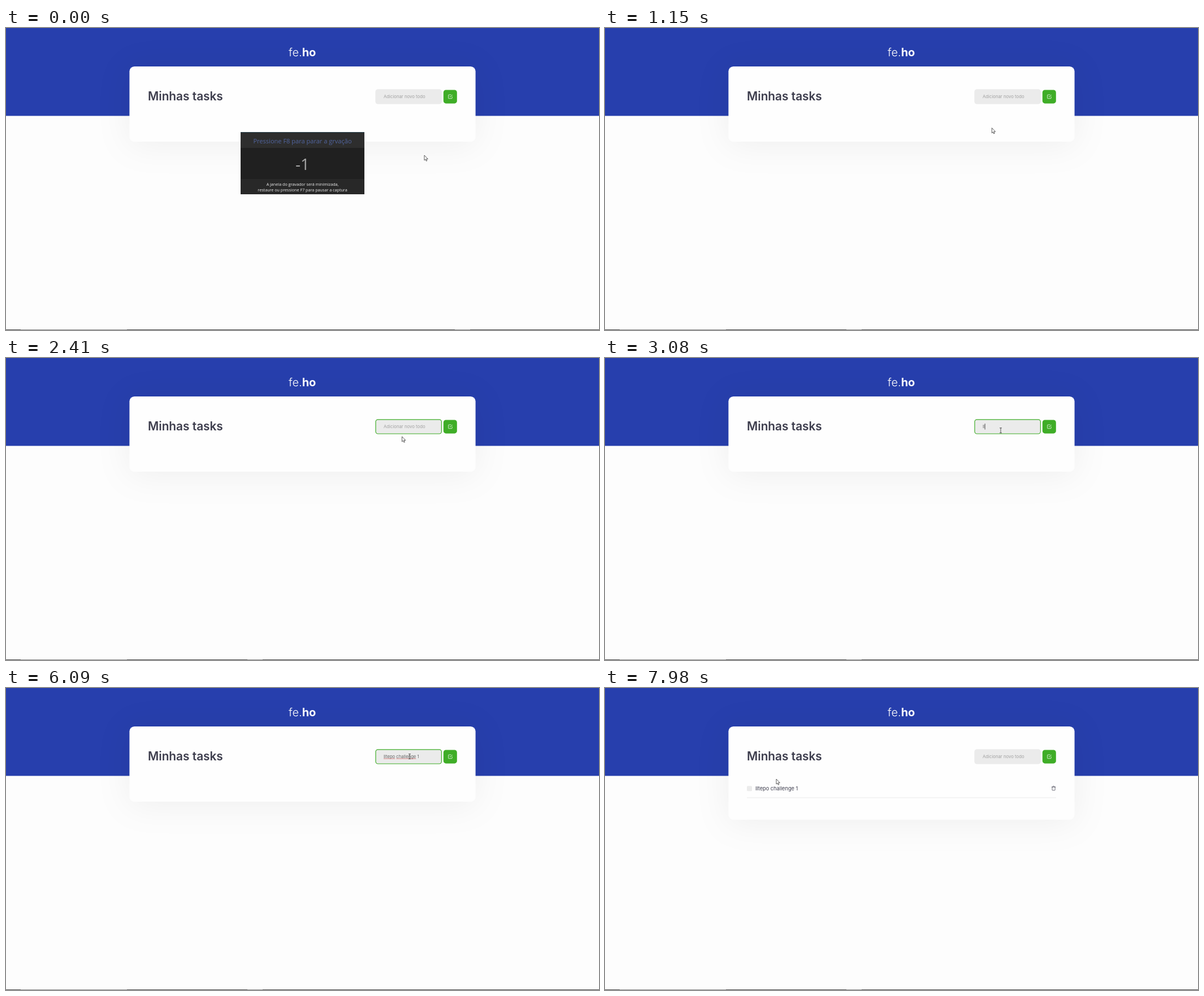
Animation, 1049 px wide and 534 px high, one loop 8000 ms. Source, as an HTML page:

```html
<!DOCTYPE html>
<html lang="pt-BR">
<head>
<meta charset="utf-8">
<title>Minhas tasks</title>
<style>
  html, body { margin: 0; width: 100%; height: 100%; overflow: hidden; background: #fdfdfd; }
  svg { display: block; }
  #card { fill: #fefefe; filter: drop-shadow(0 5px 30px rgba(0, 0, 0, .06)); }
  text { font-family: Inter, sans-serif; fill: #3d3d4d; white-space: pre; }
  .logo { font-size: 20px; font-weight: 300; fill: #fff; }
  .bold { font-weight: 700; }
  .title { font-size: 20.8px; font-weight: 600; }
  .field { font-size: 7.65px; fill: #666; }
  .hint { font-size: 7.75px; fill: #a2a2a2; }
  .task { font-size: 9.2px; }
  #dialog text { font-family: "Open Sans", "Noto Sans", sans-serif; text-anchor: middle; fill: #eee; font-size: 7.2px; }
  #dialog .stop { font-size: 11.05px; fill: #5165a0; }
  #dialog .count { font-size: 28px; fill: #a8a8a8; }
  .icon { fill: none; stroke-width: 2; stroke-linecap: round; stroke-linejoin: round; }
</style>
</head>
<body>
<svg width="1049" height="534">
  <rect width="1049" height="155.4" fill="#273fad"/>
  <rect id="card" x="218.4" y="67.9" width="612.2" rx="8.7"/>
  <text class="logo" x="500" y="50">fe.<tspan class="bold">ho</tspan></text>
  <text class="title" x="251" y="128.2">Minhas tasks</text>

  <rect id="box" x="654" y="108.8" width="116.4" height="25.2" rx="4" fill="#ebebeb" stroke-width="1.2"/>
  <text id="hint" class="hint" x="668" y="123.7">Adicionar novo todo</text>
  <text id="typed" class="field" x="668" y="123.7"></text>
  <g fill="#c44" opacity=".75">
    <rect id="mark1" y="124.6" height=".8"/>
    <rect id="mark2" y="124.6" height=".8"/>
  </g>
  <rect id="caret" y="116" width=".8" height="10.5" fill="#333"/>

  <g id="button">
    <rect x="773.8" y="109.4" width="24" height="24" rx="4.4" fill="#3fad27"/>
    <path class="icon" stroke="#fff" transform="translate(781.5 117) scale(.365)"
      d="M9 11l3 3 10-10M21 12v7a2 2 0 0 1-2 2H5a2 2 0 0 1-2-2V5a2 2 0 0 1 2-2h11"/>
  </g>

  <g id="row">
    <rect x="251" y="173.3" width="9" height="9" rx="1.6" fill="#ebebeb"/>
    <text class="task" x="266" y="181.2">Iltepo challenge 1</text>
    <path class="icon" stroke="#3d3d4d" transform="translate(789.2 172.9) scale(.365)"
      d="M3 6h18M19 6v14a2 2 0 0 1-2 2H7a2 2 0 0 1-2-2V6m3 0V4a2 2 0 0 1 2-2h4a2 2 0 0 1 2 2v2"/>
    <path d="M251 194h547" stroke="#ebebeb"/>
  </g>

  <path d="M0 533.5h1049" stroke="#484848"/>
  <path d="M26 533.5h188" stroke="#8c8c8c"/>
  <path id="tab" d="M0 533.5h27" stroke="#8c8c8c"/>

  <g id="dialog">
    <path d="M415 184h219v110h-219z" fill="#202020"/>
    <path d="M415 184h219v28h-219z" fill="#2e2e2e"/>
    <path d="M415 267h219v27h-219z" fill="#282828"/>
    <path d="M415 184.5h219" stroke="#26404a"/>
    <text class="stop" x="524.5" y="203.5">Pressione F8 para parar a grvação</text>
    <text class="count" x="524.5" y="251">-1</text>
    <text x="524.5" y="278.5">A janela do gravador será minimizada,</text>
    <text x="524.5" y="288.5">restaure ou pressione F7 para pausar a captura</text>
  </g>

  <path id="arrow" d="M0 0V9L2 7.2 3.4 10.3 4.8 9.7 3.5 6.6H6.3Z" fill="#fff" stroke="#333" stroke-width=".8"/>
  <path id="beam" d="M-2 -4.3H2M-2 4.3H2M0 -4.3V4.3" fill="none" stroke="#333" stroke-width=".8"/>
</svg>
<script>
const LOOP = 8000, STEP = 70, BLINK = 530, FOCUS = 1430, ADDED = 6510;

// bursts of typing: text, start, ms per key
const bursts = [["Iltepo ", 2950, 130], ["chall", 4080, 70], ["en", 4560, 70], ["ge ", 5030, 100], ["1", 5560, 0]];
const phrase = bursts.map(b => b[0]).join("");
const keyTimes = bursts.flatMap(([text, from, pace]) => [...text].map((_, i) => from + i * pace));

// pointer stops: step, x, y
const stops = [
  [0, 740, 225], [1, 735, 188], [3, 706, 167], [7, 676, 204], [14, 676, 204], [20, 701, 122],
  [26, 702, 168], [37, 700, 128], [86, 700, 128], [87, 714, 121], [92, 786, 122], [98, 780, 130],
  [99, 752, 147], [102, 600, 203], [107, 258, 165], [110, 350, 124], [112, 330, 183], [114, 303, 161]
];

const $ = id => document.getElementById(id);
const show = (id, on) => $(id).style.display = on ? "" : "none";
const set = (id, attrs) => { for (const k in attrs) $(id).setAttribute(k, attrs[k]); };
const clamp = v => Math.max(0, Math.min(1, v));

// the pointer moves in steps, straight from stop to stop
function pointerAt(t) {
  const s = Math.floor(t / STEP);
  const i = Math.max(1, stops.findIndex(p => p[0] >= s));
  const [s0, x0, y0] = stops[i - 1], [s1, x1, y1] = stops[i];
  const k = (s - s0) / (s1 - s0);
  return [x0 + (x1 - x0) * k, y0 + (y1 - y0) * k];
}

function underline(id, from, count, on) {
  show(id, on);
  if (!on) return;
  const text = $("typed");
  set(id, {
    x: 668 + (from ? text.getSubStringLength(0, from) : 0),
    width: text.getSubStringLength(from, count)
  });
}

function draw(t) {
  const focused = t >= FOCUS && t < ADDED, added = t >= ADDED;
  const n = focused ? keyTimes.filter(k => k <= t).length : 0;

  show("dialog", t < STEP);
  show("row", added);
  set("card", { height: added ? 164.9 : 133.1 });
  set("tab", { transform: `translate(${t < STEP ? 794 : 427})` });

  set("box", { stroke: focused ? "#3fad27" : "#ebebeb" });
  show("hint", !n);
  $("typed").textContent = phrase.slice(0, n);
  underline("mark1", 0, 6, n > 6);
  underline("mark2", 7, 9, n > 16);

  const last = n ? keyTimes[n - 1] : FOCUS;
  show("caret", focused && Math.floor((t - last) / BLINK) % 2 === 0);
  set("caret", { x: 667.8 + (n ? $("typed").getComputedTextLength() : 0) });

  const hover = clamp((t - 6300) / 200) - clamp((t - 6860) / 200);
  set("button", { opacity: 1 - .25 * hover });

  const [x, y] = pointerAt(t);
  const inField = x > 653 && x < 771 && y > 108 && y < 135;
  show("arrow", !inField);
  show("beam", inField);
  set(inField ? "beam" : "arrow", { transform: `translate(${x} ${y})` });
}

const start = performance.now();
function tick() {
  draw((performance.now() - start) % LOOP);
  requestAnimationFrame(tick);
}
tick();
</script>
</body>
</html>
```
